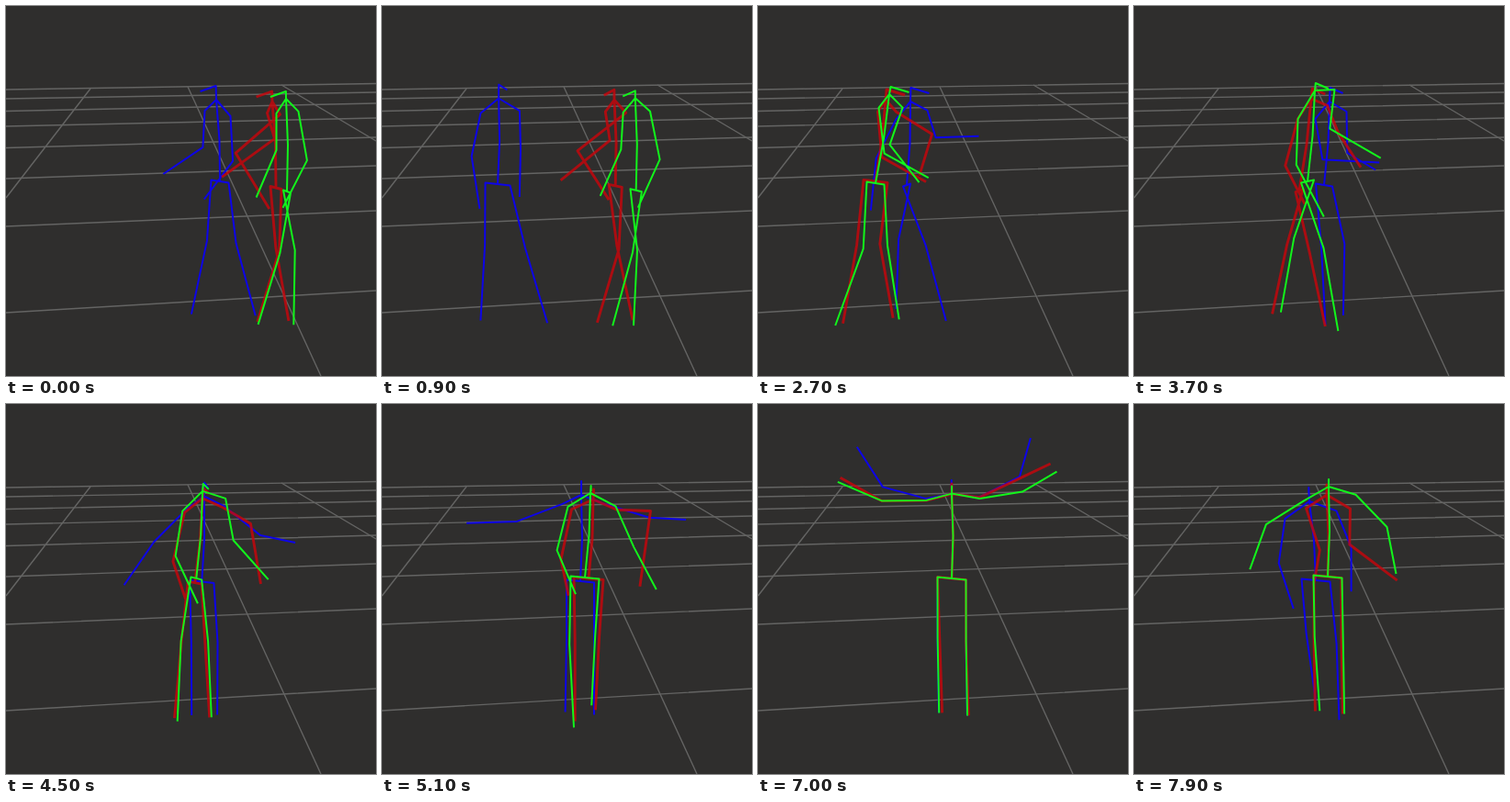
An HTML page for the animation above (8000 ms loop, 403 px wide and 403 px high).

```html
<!DOCTYPE html>
<html lang="en">
<head>
<meta charset="utf-8">
<title>Three moving skeletons</title>
<style>
  html, body { margin: 0; width: 100%; height: 100%; overflow: hidden; background: #2f2e2d; }
  svg { display: block; width: 100vw; height: 100vh; }
  path { fill: none; stroke-linejoin: round; }
  .grid { stroke: #646463; stroke-width: 1.4; }
  .blue { stroke: #0d04e8; stroke-width: 2; }
  .red { stroke: #c8060c; stroke-width: 2.9; stroke-opacity: .82; }
  .green { stroke: #12f51b; stroke-width: 2; }
</style>
</head>
<body>
<svg viewBox="0 0 403 403">
  <path class="grid" d="M0 91L403 84.500M0 101L403 94M0 114.500L403 106M0 131L403 122M0 154.500L403 143M0 188L403 174M0 240L403 223M0 334L403 310"/>
  <path class="grid" d="M92 90L0 209M198 88L343 403M300 86L403 147"/>
  <path class="blue"/>
  <path class="red"/>
  <path class="green"/>
</svg>
<script>
const LOOP = 8000, STEP = 100;
const names = ['blue', 'red', 'green'];
const headHeight = { blue: 15, red: 11, green: 8 };

// Angles are in degrees: 0 hangs down, positive swings to the right.
// turn: half widths of chest and hips, then shoulder tilt.
// left, right: upper arm and forearm angles, then their visible lengths.
// legs: thigh and shin angles of both legs, then the visible leg lengths.
// ease: one exponent per figure for the way to the next beat.
const beats = [
  { time: 0, ease: [.5, 2, 2.8], all: { face: -17 },
    blue: { hip: [233, 191], neck: [229, 102], turn: [14, 9.5, 3], left: [-3, -56, 40], right: [3, -37], legs: [-4, -12, 7, 15] },
    red: { hip: [294, 198], neck: [290, 104], turn: [7, 6, 2], left: [16, -54, 29, 71], right: [-49, 31, 64, 71], legs: [5, 10, -2, -17] },
    green: { hip: [306, 202], neck: [305, 101], turn: [12, 4, -1], left: [0, -23, 40, 56], right: [10, -27, 54, 58], legs: [11, -1, -10, -17] } },
  { time: 1700, ease: [1.3, 1, 1], all: { face: 4 },
    blue: { hip: [86, 195], neck: [89, 100], turn: [24, 15, -3], left: [-15, 33, 51, 60], right: [1, 12, 39], legs: [1, 0, 16, 17, 151, 158], face: 19 },
    red: { hip: [152, 190], neck: [158, 98], turn: [22, 10, 2], left: [-9, -43, 38, 64], right: [-59, 37, 75, 44], legs: [14, 17, -5, -15, 156, 159] },
    green: { hip: [132, 194], neck: [132, 97], turn: [28, 17, 2], left: [-20, -29, 44], right: [18, -11, 51, 56], legs: [-16, -12, -1, -7, 157, 159] } },
  { time: 2700, ease: [1, 1, 1], all: { face: 20 },
    blue: { hip: [162, 195], neck: [166, 104], turn: [17, -4, -5], left: [-27, -6, 48, 57], right: [17, 92, 31, 47], legs: [-12, -2, 21, 15, 138, 154] },
    red: { hip: [128, 191], neck: [139, 102], turn: [10, 13, 2], left: [5, 61, 50, 55], right: [58, -17, 46, 47], legs: [-6, -10, -7, 10, 158, 149] },
    green: { hip: [128, 193], neck: [143, 96], turn: [13, 9.5, 0], left: [7, 61, 50, 55], right: [-19, 38, 43], legs: [-3, -20, 3, 9, 162, 148] } },
  { time: 3700, ease: [.65, 1, 1], all: { face: 14 },
    blue: { hip: [207, 195], neck: [213, 104], turn: [17, 9, -4], left: [10, 87, 45, 62], right: [1, 59, 45, 36], legs: [5, 3, 12, -1, 154, 142] },
    red: { hip: [180, 201], neck: [193, 101], turn: [16, -4, -7], left: [-15, 27, 53, 47], right: [22, 33, 32, 45], legs: [-16, -12, 13, 12, 140, 150] },
    green: { hip: [189, 191], neck: [197, 92], turn: [20, -7, -16], left: [-2, 28, 50, 64], right: [-7, 60, 43, 64], legs: [-19, -10, 19, 10, 149, 167] } },
  { time: 5100, ease: [.4, .7, .7], all: { turn: [26, 15.5, 0] },
    blue: { hip: [216, 193], neck: [217, 99], turn: [22, 15, 0], left: [-69, -88, 53, 55], right: [73, 87, 53, 40], legs: [0, -1, 0, 0, 144, 144] },
    red: { hip: [225, 190], neck: [230, 104], turn: [25, 16, 4], left: [-12, 12, 56, 40], right: [88, -8, 36, 83], legs: [1, 0, -4, -3, 157, 142] },
    green: { hip: [221, 189], neck: [227, 97], left: [-14, 23], right: [24, 28], legs: [-1, 3, -4, -3, 165, 138] } },
  { time: 6200, ease: [6, 5, 4], all: { hip: [211, 190], neck: [211, 98], turn: [29, 15.5, 0] },
    blue: { left: [-106, -149], right: [118, 166, 49, 44] },
    red: { left: [-92, -122], right: [118, 117, 47, 38], legs: [2, 2, 0, 2] },
    green: { left: [-91, -118], right: [102, 126, 47, 43] } },
  { time: 7900, all: { hip: [211, 188], turn: [28, 15.5, -4] },
    blue: { hip: [198, 192], neck: [191, 106], left: [-8, 18], right: [22, 0, 43, 48], legs: [5, 8, 6, 2, 133, 151] },
    red: { neck: [210, 99], turn: [24, 15, 0], left: [18, -10, 48, 39], right: [-1, 53, 39, 65] },
    green: { neck: [212, 90], left: [-58, -20], right: [44, 11], legs: [1, 4, 1, 1] } }
];

const withDefaults = (given, defaults) => defaults.map((d, i) => given[i] ?? d);

// One flat list of rig settings, ready to be blended.
function settings(beat, name) {
  const { hip, neck, turn, left, right, legs = [], face = 0 } = { ...beat.all, ...beat[name] };
  return [
    ...hip, ...neck, ...turn,
    ...withDefaults(left, [0, 0, 49, 52]),
    ...withDefaults(right, [0, 0, 49, 52]),
    ...withDefaults(legs, [0, 1, 0, 1, 148, 148]),
    face
  ];
}

function settingsAt(name, time) {
  let i = beats.length - 2;
  while (time < beats[i].time) i--;
  const from = beats[i], to = beats[i + 1];
  const p = (time - from.time) / (to.time - from.time);
  const e = p ** from.ease[names.indexOf(name)];
  const end = settings(to, name);
  return settings(from, name).map((v, j) => v + (end[j] - v) * e);
}

const rad = deg => deg * Math.PI / 180;
const swing = ([x, y], deg, length) => [x + Math.sin(rad(deg)) * length, y + Math.cos(rad(deg)) * length];
const line = points => 'M' + points.map(p => p.map(v => v.toFixed(1)).join(' ')).join('L');

function skeleton(name, time) {
  const [px, py, nx, ny, chest, hips, tilt,
    upL, foreL, upLenL, foreLenL, upR, foreR, upLenR, foreLenR,
    thighL, shinL, thighR, shinR, legL, legR, face] = settingsAt(name, time);
  const neck = [nx, ny], pelvis = [px, py];

  // Raised arms lift their shoulder.
  const arm = (side, up, fore, upLen, foreLen) => {
    const shoulder = [nx + 1.5 + side * chest, ny + 7 + 8 * Math.cos(rad(up)) + side * tilt];
    const elbow = swing(shoulder, up, upLen);
    return [shoulder, elbow, swing(elbow, fore, foreLen)];
  };
  const leg = (side, thigh, shin, length) => {
    const hip = [px + side * hips, py + side * 1.5];
    const knee = swing(hip, thigh, length * .45);
    return [hip, knee, swing(knee, shin, length * .55)];
  };

  const head = [nx + (nx - px) * .1, ny - headHeight[name]];
  const tip = [head[0] + face, head[1] + 6];
  const mid = [(nx + px) / 2 + 1.5, (ny + py) / 2];
  return line([...arm(-1, upL, foreL, upLenL, foreLenL).reverse(), neck, ...arm(1, upR, foreR, upLenR, foreLenR)])
    + line([tip, head, neck, mid, pelvis])
    + line([...leg(-1, thighL, shinL, legL).reverse(), pelvis, ...leg(1, thighR, shinR, legR)]);
}

const start = performance.now();

function draw() {
  const now = Math.max(0, performance.now() - start) % LOOP;
  const time = Math.floor(now / STEP) * STEP;
  for (const name of names) {
    document.querySelector('.' + name).setAttribute('d', skeleton(name, time));
  }
  requestAnimationFrame(draw);
}
draw();
</script>
</body>
</html>
```
